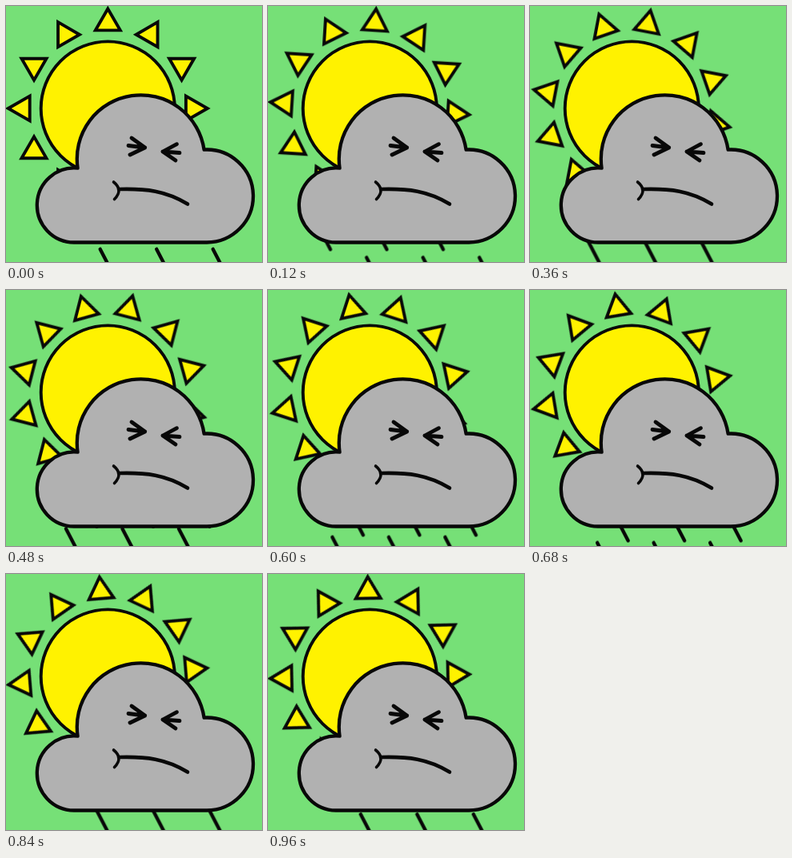
Recreate the animation shown at these times as an HTML page. Size 320 by 320 pixels, loop 1000 ms.

```html
<!DOCTYPE html>
<html lang="en">
<head>
<meta charset="utf-8">
<title>Sun and rain cloud</title>
<style>
  html, body { margin: 0; width: 100%; height: 100%; overflow: hidden; background: #76e077; }
  svg { display: block; width: 100%; height: 100%; }
  .line { stroke: #080808; stroke-width: 3.9; stroke-linecap: round; fill: none; }
  .sun { fill: #fff200; stroke-linejoin: miter; }
  .cloud { fill: #b1b1b1; stroke-width: 4.3; stroke-linejoin: round; }
  .drop { stroke-width: 4.4; }
  .eye { stroke-width: 4.8; stroke-linejoin: round; }
  .mouth { stroke-width: 4.6; }
  .cheek { stroke-width: 3.6; }
  #rays { transform-origin: 127.3px 128px; }
</style>
</head>
<body>
<svg viewBox="0 0 320 320">
  <g id="rays"></g>
  <circle class="line sun" cx="127.3" cy="128" r="83.6"/>
  <g id="rain"></g>
  <path class="line cloud" d="M85 295.5A46.5 46.5 0 1 1 89.6 202.7A79.8 79.8 0 0 1 247.6 179.6A58 58 0 1 1 250.6 295.5Z"/>
  <path class="line eye" d="M157 165L173.7 177L155 186M153 174.5L173.7 177"/>
  <path class="line eye" d="M213.5 172.7L196 182L212 193M217 183.5L196 182"/>
  <path class="line cheek" d="M134.5 220Q147 230 135.5 241.5"/>
  <path class="line mouth" d="M141 229C175 228 200 231 227 247.5"/>
</svg>
<script>
  const LOOP = 1000, STEPS = 25;
  const FALL = 87.5, SLOPE = 0.52, DROP = 37.3, EDGE = 296;
  const rays = document.getElementById('rays');
  const rain = document.getElementById('rain');

  function add(parent, tag, attrs) {
    const el = document.createElementNS('http://www.w3.org/2000/svg', tag);
    for (const k in attrs) el.setAttribute(k, attrs[k]);
    parent.append(el);
  }

  for (let a = 0; a < 360; a += 30) {
    add(rays, 'path', {
      class: 'line sun',
      d: 'M127.3 3.5L142.8 30.4H111.8Z',
      transform: `rotate(${a} 127.3 128)`
    });
  }

  // x is where the drop's track meets the cloud edge, tip its lowest point at time 0
  function drops(x, tip) {
    for (let i = 0; i < 3; i++) {
      const at = y => `${x + i * 70.5 + (y - EDGE) * SLOPE} ${y}`;
      for (const y of [tip, tip + FALL]) {
        add(rain, 'path', { class: 'line drop', d: `M${at(y - DROP)}L${at(y)}` });
      }
    }
  }
  drops(73.7, 293.7);
  drops(113.6, 253.7);

  function loop(el, from, to) {
    el.animate([{ transform: from }, { transform: to }],
      { duration: LOOP, iterations: Infinity, easing: `steps(${STEPS}, end)` });
  }
  loop(rays, 'rotate(0deg)', 'rotate(30deg)');
  loop(rain, 'translate(0px, 0px)', `translate(${FALL * SLOPE}px, ${FALL}px)`);
</script>
</body>
</html>
```
